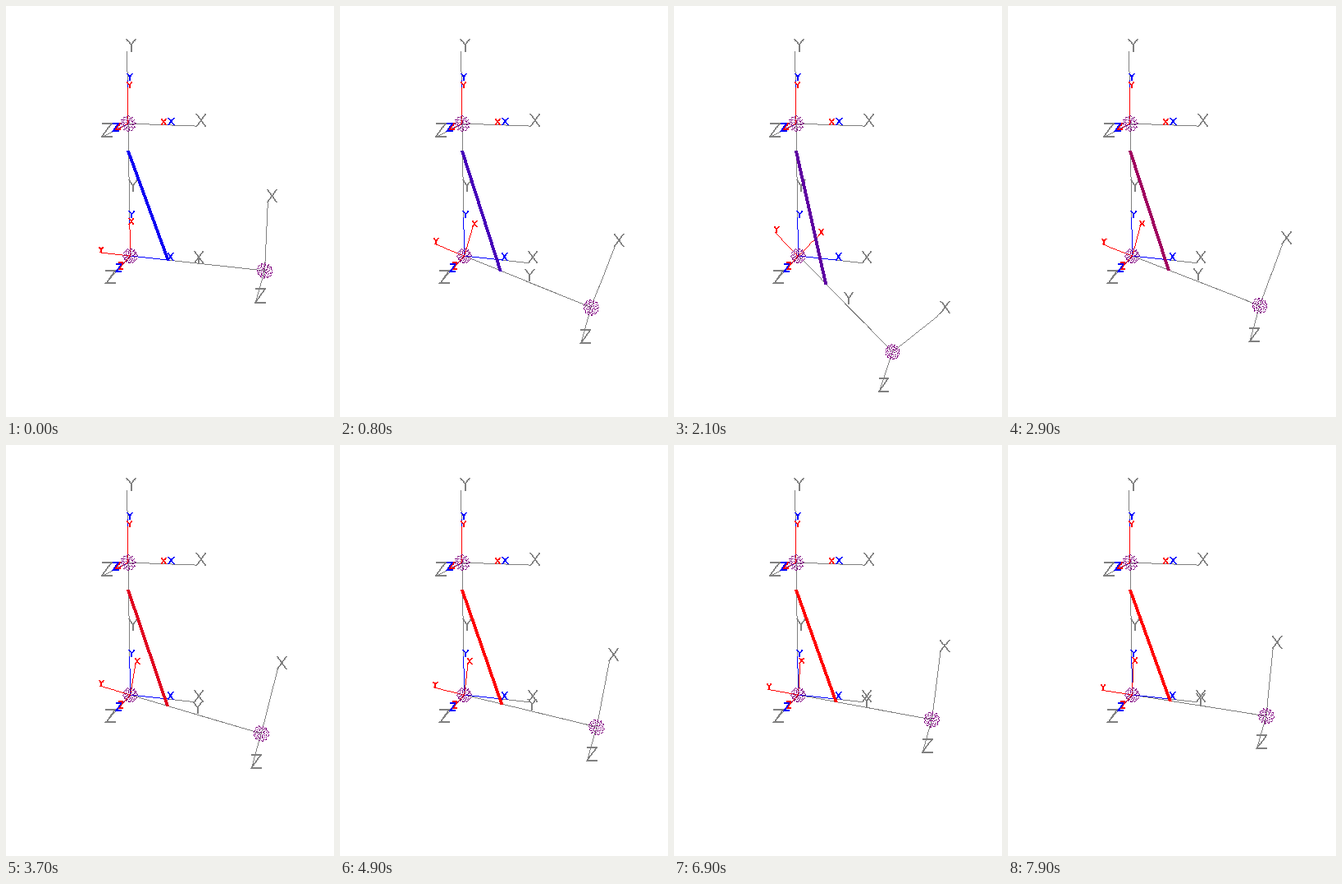
A matplotlib script for the animation above (8000 ms loop, 400 px wide and 500 px high).

```python
import numpy as np
import matplotlib.pyplot as plt
from matplotlib.animation import FuncAnimation

W, H, DPI = 400, 500, 100
FRAMES, STEP = 80, 100
GREY, RED, BLUE, PURPLE = (128, 128, 128), (255, 0, 0), (0, 0, 255), (128, 0, 128)

# perspective camera: rows give screen x, screen y and depth
CAMERA = np.array([[141.9, -11.0, -84.4, 151.5],
                   [-4.5, -169.1, -2.4, 304.0],
                   [-.07, -.057, -.208, 1.0]])

GLYPHS = {
    'X': [[(0, 0), (1, 1)], [(0, 1), (1, 0)]],
    'Y': [[(0, 1), (.5, .52), (1, 1)], [(.5, .52), (.5, 0)]],
    'Z': [[(0, 1), (1, 1), (0, 0), (1, 0)]],
}

ELBOW, SHOULDER = np.zeros(3), np.array([0, 1.0, 0])
WORLD = np.eye(3)
TURN = 1.95  # moment the falling arm is caught, in seconds


def elbow_angle(t):
    """Arm angle below horizontal: a fall, a quick catch, a slow lift."""
    def lift(s):
        return 2.6 + 1.45 * (7.9 - s)

    if t < TURN:
        deg = (lift(TURN) + 35) * np.sin(np.pi / 2 * t / TURN) ** 2
    else:
        deg = lift(t) + 35 / (1 + ((t - TURN) / .446) ** 2.1)
    return np.radians(deg)


def activation(t):
    """Muscle activation: a weak first response, then full effort."""
    if t < 2.5:
        return .05 + .34 * (1 - np.exp(-t / .75))
    return min(1, 1.03 - .65 * np.exp(-(t - 2.5) / .83))


def project(p):
    p = np.atleast_2d(p)
    q = np.c_[p, np.ones(len(p))] @ CAMERA.T
    return q[:, :2] / q[:, 2:], q[:, 2]


def sphere(radius=.053, stacks=10, slices=12):
    lat, lon = np.meshgrid(np.pi * np.arange(1, stacks) / stacks,
                           2 * np.pi * np.arange(slices) / slices)
    lat, lon = lat.ravel(), lon.ravel()
    return radius * np.c_[np.sin(lat) * np.cos(lon), np.sin(lat) * np.sin(lon), np.cos(lat)]


BALL = sphere()


class Canvas:
    """Hard-edged pixel drawing of points and lines in space."""

    def __init__(self):
        self.pixels = np.full((H, W, 3), 255, np.uint8)

    def plot(self, xy, color):
        x, y = np.floor(xy).astype(int).T
        inside = (x >= 0) & (x < W) & (y >= 0) & (y < H)
        self.pixels[y[inside], x[inside]] = color

    def stroke(self, a, b, color, width):
        span = np.abs(b - a)
        path = np.linspace(a, b, int(np.ceil(span.max())) + 1)
        minor = span.argmin()
        for k in range(width):
            shifted = path.copy()
            shifted[:, minor] += k - width // 2
            self.plot(shifted, color)

    def line(self, a, b, color, width=1):
        self.stroke(*project([a, b])[0], color, width)

    def letter(self, char, pos, size, color):
        (origin,), (depth,) = project(pos)
        scale = np.array([20, -27]) * size / depth
        for glyph in GLYPHS[char]:
            pts = origin + np.array(glyph) * scale
            for a, b in zip(pts, pts[1:]):
                self.stroke(a, b, color, 2)

    def axes(self, origin, frame, size, color, names='XYZ'):
        for name, axis in zip('XYZ', frame):
            if name in names:
                self.line(origin, origin + size * axis, color)

    def letters(self, origin, frame, size, color):
        for name, axis in zip('XYZ', frame):
            self.letter(name, origin + size * axis, size, color)

    def ball(self, center, frame):
        self.plot(project(BALL @ frame + center)[0], PURPLE)


def render(t):
    angle, act = elbow_angle(t), activation(t)
    c, s = np.cos(angle), np.sin(angle)
    arm = np.array([c, -s, 0])
    local = np.array([[s, c, 0], -arm, [0, 0, 1]])
    joints = ((SHOULDER, WORLD), (ELBOW, WORLD), (arm, local))

    cv = Canvas()
    cv.line(ELBOW, SHOULDER, GREY)
    cv.line(ELBOW, arm, GREY)
    for origin, frame in joints:
        cv.axes(origin, frame, .5, GREY)
        cv.letters(origin, frame, .5, GREY)

    cv.axes(SHOULDER, WORLD, .3, BLUE, 'YZ')
    cv.axes(SHOULDER, WORLD, .25, RED, 'YZ')
    cv.axes(ELBOW, WORLD, .3, BLUE)
    cv.axes(ELBOW, local, .25, RED)
    for origin, frame in ((SHOULDER, WORLD), (ELBOW, local)):
        cv.letters(origin, frame, .25, RED)
        cv.letters(origin, WORLD, .3, BLUE)

    muscle = (round(255 * act), 0, round(255 * (1 - act)))
    cv.line(np.array([0, .8, 0]), .3 * arm, muscle, 4)
    for origin, frame in joints:
        cv.ball(origin, frame)
    return cv.pixels


fig = plt.figure(figsize=(W / DPI, H / DPI), dpi=DPI, facecolor='white')
ax = fig.add_axes([0, 0, 1, 1])
ax.axis('off')
picture = ax.imshow(render(0), interpolation='nearest', aspect='auto')


def draw(i):
    picture.set_data(render(i * STEP / 1000))
    return picture,


anim = FuncAnimation(fig, draw, frames=FRAMES, interval=STEP, repeat=True,
                     repeat_delay=0, init_func=lambda: draw(0))
plt.show()
```
